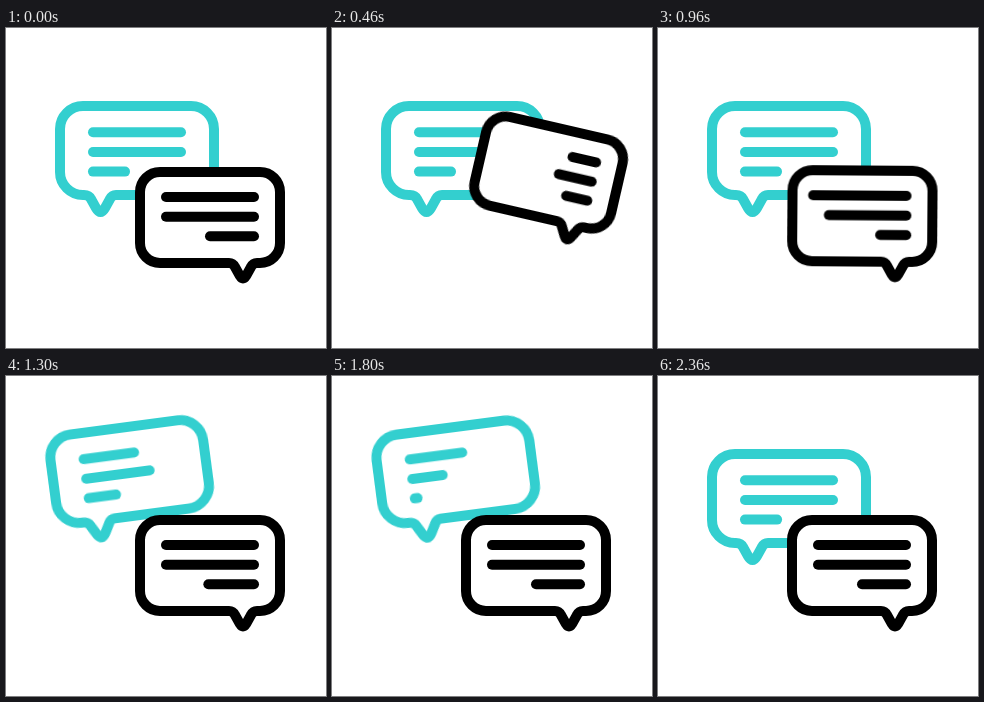
Recreate the animation shown at these times as an HTML page. Size 320 by 320 pixels, loop 2420 ms.

```html
<!DOCTYPE html>
<html lang="en">
<head>
<meta charset="utf-8">
<title>Chat bubbles</title>
<style>
  html, body { margin: 0; width: 100%; height: 100%; overflow: hidden; background: #fff; }
  svg { display: block; width: 100vw; height: 100vh; }

  .bubble, .line {
    animation: 2420ms cubic-bezier(.3333, 0, .6667, 1) var(--delay) infinite;
  }
  .bubble {
    fill: #fff;
    stroke-width: 10;
    stroke-linecap: round;
    stroke-linejoin: round;
    animation-name: lift;
  }
  .teal  { --delay: 1000ms; --turn: -15deg; stroke: #33cfcf; transform-origin: 94px 176px; }
  .black { --delay: 0ms; --turn: 15deg; stroke: #000; transform-origin: 237px 242px; }

  /* Each line is drawn 20% too long, so it can overshoot its resting length of 1 */
  .line { fill: none; stroke-dasharray: 1 9; }
  .first  { animation-name: first; }
  .second { animation-name: second; }
  .third  { animation-name: third; }

  @keyframes lift {
    0%, 41.322%, 100% { transform: translateY(0) rotate(0deg); }
    24.793% { transform: translateY(-45px) rotate(var(--turn)); }
  }
  @keyframes first {
    0%, 51.033%, 100% { stroke-dasharray: 1 9; }
    24.793% { stroke-dasharray: .16 9; }
    42.355% { stroke-dasharray: 1.12 9; }
  }
  @keyframes second {
    0%, 3.306%, 54.008%, 100% { stroke-dasharray: 1 9; }
    27.769% { stroke-dasharray: .13 9; }
    45.331% { stroke-dasharray: 1.12 9; }
  }
  @keyframes third {
    0%, 6.612%, 56.983%, 100% { stroke-dasharray: 1 9; }
    30.744% { stroke-dasharray: .03 9; }
    48.306% { stroke-dasharray: 1.12 9; }
  }
</style>
</head>
<body>
<svg viewBox="0 0 320 320">
  <g class="bubble teal">
    <path d="M77 78H185A23 23 0 0 1 208 101V144A23 23 0 0 1 185 167H110q-4 0-6 4l-5 9q-4.5 8-9 0l-5-9q-2-4-7-4H77A23 23 0 0 1 54 144V101A23 23 0 0 1 77 78Z"/>
    <path class="line first" pathLength="1.2" d="M87 104.3h105.6"/>
    <path class="line second" pathLength="1.2" d="M87 124h105.6"/>
    <path class="line third" pathLength="1.2" d="M87 143.6h38.4"/>
  </g>
  <g class="bubble black">
    <path d="M154 144H254A20 20 0 0 1 274 164V215A20 20 0 0 1 254 235H251q-4 0-6 4l-5 9q-3 5-6 0l-5-9q-2-4-6-4H154A20 20 0 0 1 134 215V164A20 20 0 0 1 154 144Z"/>
    <path class="line first" pathLength="1.2" d="M248 169h-105.6"/>
    <path class="line second" pathLength="1.2" d="M248 188.7h-105.6"/>
    <path class="line third" pathLength="1.2" d="M248 208.3h-52.8"/>
  </g>
</svg>
</body>
</html>
```
